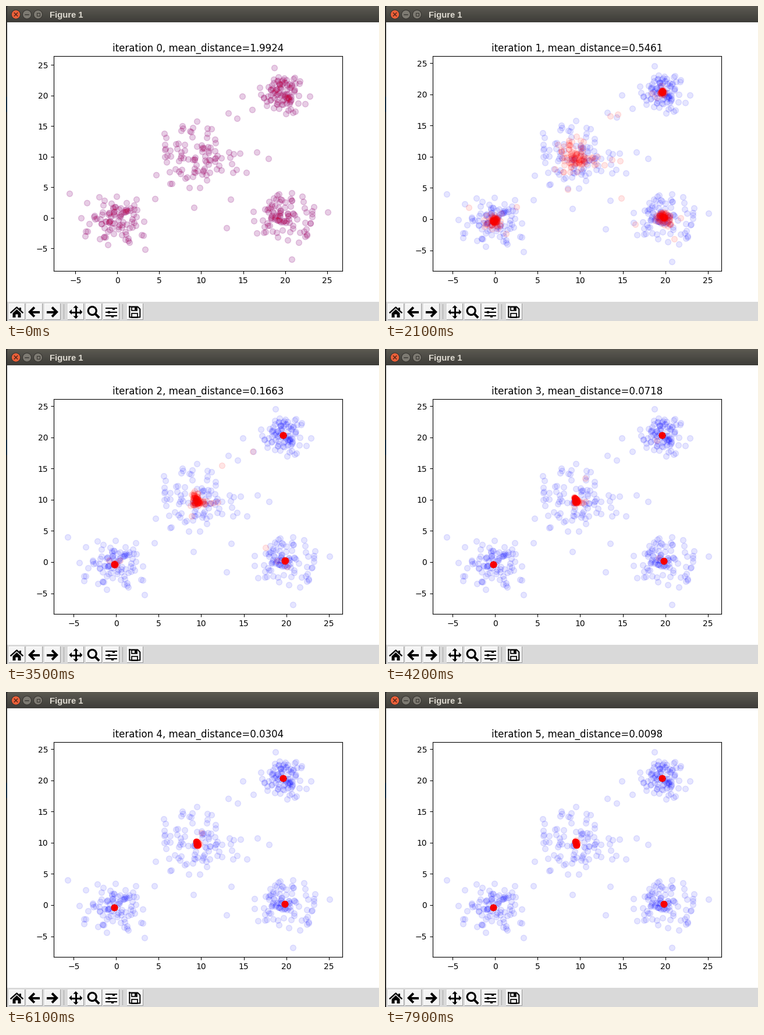
A matplotlib script for the animation above (8000 ms loop, 641x541 px).

```python
import numpy as np
import matplotlib.pyplot as plt
from matplotlib.animation import FuncAnimation
from matplotlib.patches import Circle, Polygon, Rectangle

W, H, DPI = 641, 541, 100
PT = 72 / DPI  # points per pixel
FRAMES, INTERVAL, FRAMES_PER_STEP = 80, 100, 15
PER_CLUSTER, RADIUS = 100, 5
DISTANCES = [1.9924, 0.5461, 0.1663, 0.0718, 0.0304, 0.0098]
FIRST_VIEW = (-7.592, 26.83), (-8.714, 26.486)
LATER_VIEW = (-7.351, 26.6), (-8.321, 26.157)

# centre, spread, cut-off in spreads
CLUSTERS = [
    ((-0.2, -0.33), 2.1, 2.1),
    ((9.4, 10.0), 2.9, 2.0),
    ((19.72, 20.35), 1.6, 2.0),
    ((19.84, 0.23), 2.1, 2.1),
]
# lone points between and around the clusters
STRAYS = [(-5.7, 4), (3.3, -5.2), (4.5, 3.1), (9.1, 1.7), (13, -1.6),
          (13.5, 3), (15.4, 7.4), (16.6, 10.7), (18, 9.7), (14.3, 16.3),
          (13.2, 17.1), (14.9, 19.9), (16.1, 17.7), (18.7, 24.5),
          (20.8, -6.8), (25.1, 0.9)]


def make_points():
    rng = np.random.default_rng(12)
    groups = [np.array(STRAYS)]
    for centre, spread, cut in CLUSTERS:
        unit = rng.normal(size=(PER_CLUSTER * 2, 2))
        unit = unit[np.hypot(*unit.T) < cut][:PER_CLUSTER - 4]
        groups.append(centre + spread * (unit - unit.mean(axis=0)))
    return np.vstack(groups)


def mean_shift(points, data):
    gaps = np.linalg.norm(points[:, None] - data[None], axis=2)
    weights = (gaps < RADIUS).astype(float)
    return weights @ data / weights.sum(axis=1, keepdims=True)


data = make_points()
steps = [data]
while len(steps) < len(DISTANCES):
    steps.append(mean_shift(steps[-1], data))

fig = plt.figure(figsize=(W / DPI, H / DPI), dpi=DPI, facecolor="white")
stage = fig.add_axes([0, 0, 1, 1])
stage.set(xlim=(0, W), ylim=(H, 0))
stage.axis("off")


def line(points, width, color="black", **style):
    stage.plot(*zip(*points), color=color, lw=width * PT, **style)


def shape(points, color="black"):
    stage.add_patch(Polygon(points, fc=color, ec="none"))


def box(x, y, w, h, color, edge="none", width=1):
    stage.add_patch(Rectangle((x, y), w, h, fc=color, ec=edge, lw=width * PT))


def disc(x, y, r, color, edge="none", width=1):
    stage.add_patch(Circle((x, y), r, fc=color, ec=edge, lw=width * PT))


def draw_title_bar():
    top, bottom = np.array([0x5B, 0x59, 0x51]), np.array([0x3D, 0x3C, 0x38])
    for y in range(28):
        box(0, y, W, 1, (top + (bottom - top) * y / 27) / 255)
    box(0, 0, 2, H, "#2b2a29")
    box(0, 156, 1.5, 26, "#10283c")
    shape([(0, 0), (4, 0), (1.5, 1.5), (0, 4)], "#2b2a29")
    dark = "#3b3a35"
    disc(17, 14.5, 7.7, "#ec6039", "#35332f")
    for x in (36, 55):
        disc(x, 14.5, 7.5, "#7d7a72", "#35332f")
    for d in (-2.7, 2.7):
        line([(14.3, 14.5 - d), (19.7, 14.5 + d)], 1.4, "#51251a")
    line([(33, 14.5), (39, 14.5)], 1.5, dark)
    box(52.5, 12, 5, 5, "none", dark, 1.2)
    stage.text(75, 20, "Figure 1", color="#dfdbd2", size=10.7, weight="bold",
               family="Liberation Sans")


def draw_home(x, y):
    line([(x - 10, y + 1), (x, y - 8), (x + 10, y + 1)], 2.4)
    box(x + 4.5, y - 8, 3, 6, "black")
    shape([(x - 7, y + 2), (x, y - 4.5), (x + 7, y + 2), (x + 7, y + 9.5),
           (x + 2, y + 9.5), (x + 2, y + 4), (x - 2, y + 4),
           (x - 2, y + 9.5), (x - 7, y + 9.5)])


def draw_arrow(x, y, way):
    tip = x + 8 * way
    line([(tip - 8 * way, y - 8), (tip, y), (tip - 8 * way, y + 8)], 4,
         solid_joinstyle="miter", solid_capstyle="butt")
    line([(tip, y), (x - 9 * way, y)], 4, solid_capstyle="butt")


def draw_move(x, y):
    for dx, dy in ((1, 0), (-1, 0), (0, 1), (0, -1)):
        line([(x, y), (x + 8 * dx, y + 8 * dy)], 3)
        shape([(x + 11.5 * dx, y + 11.5 * dy),
               (x + 7 * dx + 4.5 * dy, y + 7 * dy + 4.5 * dx),
               (x + 7 * dx - 4.5 * dy, y + 7 * dy - 4.5 * dx)])


def draw_zoom(x, y):
    disc(x - 2, y - 2, 7, "none", "black", 3.2)
    line([(x + 4, y + 4), (x + 8.5, y + 8.5)], 4)


def draw_sliders(x, y):
    for dy, knob in ((-6.5, 4), (0, -4), (6.5, 2)):
        line([(x - 10, y + dy), (x + 10, y + dy)], 2, solid_capstyle="butt")
        box(x + knob - 2.5, y + dy - 2.5, 5, 5, "black", "white")


def draw_disk(x, y):
    line([(x - 9, y - 9), (x + 5, y - 9), (x + 9, y - 5), (x + 9, y + 9),
          (x - 9, y + 9), (x - 9, y - 9)], 2)
    box(x - 5, y + 2, 10, 7, "none", "black", 1.7)
    box(x - 5, y - 9, 9, 6, "none", "black", 1.7)
    box(x, y - 8, 3, 4, "black")


def draw_toolbar():
    box(2, 508, W - 2, 33, "#d9d9d9")
    icons = [draw_home, lambda x, y: draw_arrow(x, y, -1),
             lambda x, y: draw_arrow(x, y, 1), None,
             draw_move, draw_zoom, draw_sliders, None, draw_disk]
    x = 5
    for icon in icons:
        if icon is None:
            box(x + 3, 512, 1, 26, "#a6a6a6")
            x += 10.5
            continue
        box(x, 511, 28, 28, "#9a9a9a")
        box(x, 511, 27, 27, "#ffffff")
        box(x + 1, 512, 26, 26, "#f4f4f4")
        icon(x + 13.5, 525.5)
        x += 30.3


draw_title_bar()
draw_toolbar()

ax = fig.add_axes([82 / W, 1 - 455.2 / H, 496 / W, 369.6 / H])
ax.scatter(*data.T, c="blue", s=50, alpha=0.1)
moving = ax.scatter(*data.T, c="red", s=50, alpha=0.1)
ax.set_xticks(range(-5, 26, 5))
ax.set_yticks(range(-5, 26, 5))
title = ax.set_title("")


def update(frame):
    step = (frame + 6) // FRAMES_PER_STEP
    xlim, ylim = LATER_VIEW if step else FIRST_VIEW
    ax.set(xlim=xlim, ylim=ylim)
    moving.set_offsets(steps[step])
    title.set_text(f"iteration {step}, mean_distance={DISTANCES[step]:.4f}")
    return moving, title


anim = FuncAnimation(fig, update, frames=FRAMES, interval=INTERVAL,
                     repeat=True, repeat_delay=0)
plt.show()
```
